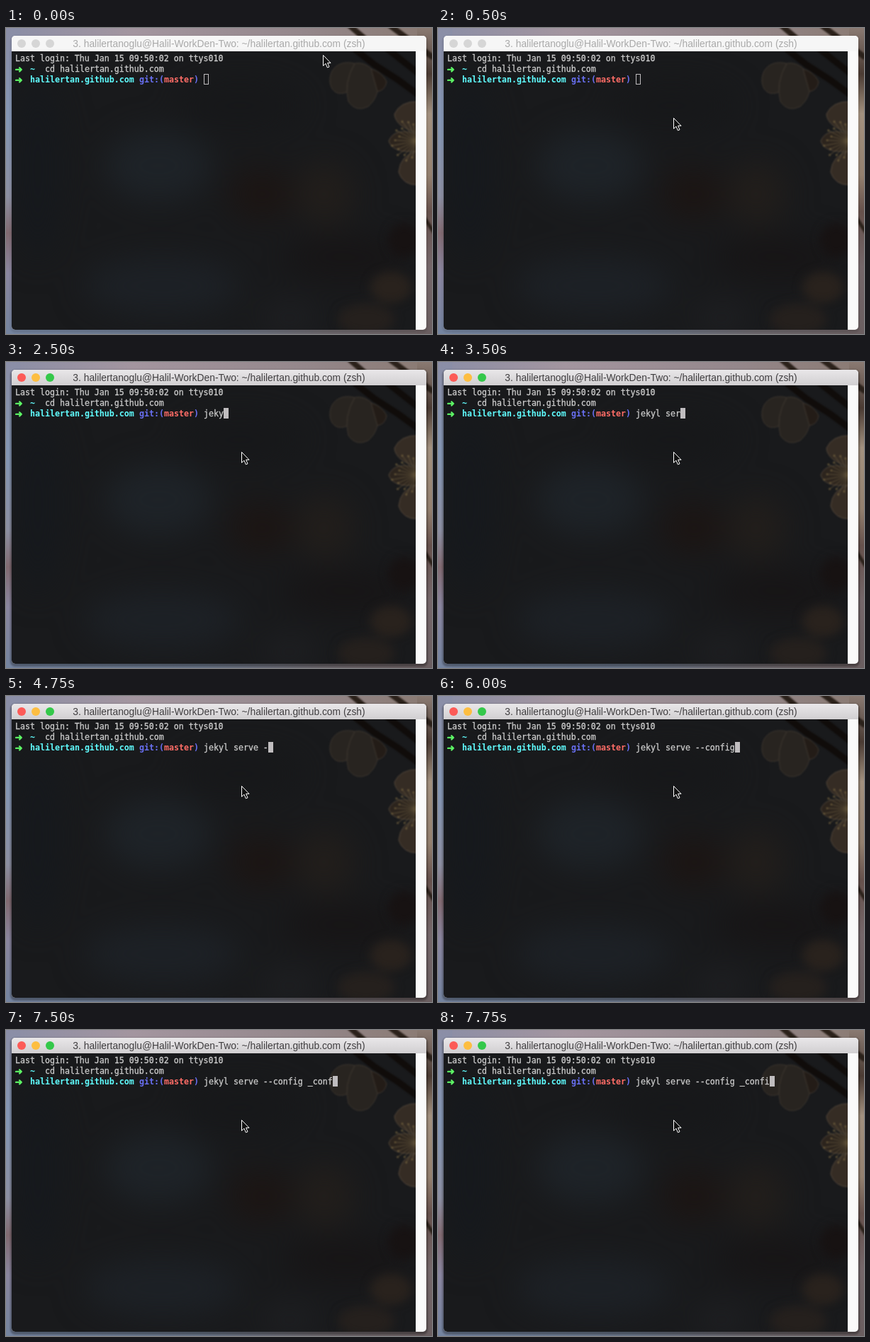
An HTML page for the animation above (8 s loop, 601 by 433 pixels).

```html
<!DOCTYPE html>
<html lang="en">
<head>
<meta charset="utf-8">
<title>Terminal</title>
<style>
html, body { margin: 0; width: 100%; height: 100%; overflow: hidden; }
svg { display: block; width: 601px; height: 433px; }
filter { color-interpolation-filters: sRGB; }
text { white-space: pre; }
.term { font: 11.627px "DejaVu Sans Mono", monospace; fill: #cbcbcb; stroke: #cbcbcb; stroke-width: .3px; }
.title { font: 13.84px "Liberation Sans", Arial, sans-serif; text-anchor: middle; }
.bold { font-weight: bold; stroke: none; }
.cyan { fill: #60fdff; }
.green { fill: #5ff967; stroke: #5ff967; stroke-width: .7px; font-family: "DejaVu Sans", sans-serif; font-size: 13px; }
.blue { fill: #6a71f6; }
.red { fill: #ff6d67; }
</style>
</head>
<body>
<svg viewBox="0 0 601 433">
  <defs>
    <filter id="soft" x="-100%" y="-100%" width="300%" height="300%"><feGaussianBlur stdDeviation="22"/></filter>
    <filter id="haze" x="-50%" y="-50%" width="200%" height="200%"><feGaussianBlur stdDeviation="7"/></filter>
    <filter id="edge" x="-10%" y="-10%" width="120%" height="120%"><feGaussianBlur stdDeviation="1"/></filter>
    <linearGradient id="top">
      <stop offset="0" stop-color="#8b8ea6"/><stop offset=".3" stop-color="#a3959f"/>
      <stop offset=".7" stop-color="#94878b"/><stop offset="1" stop-color="#8a7a72"/>
    </linearGradient>
    <linearGradient id="left" x2="0" y2="1">
      <stop offset="0" stop-color="#8b8ea6"/><stop offset=".3" stop-color="#8496b4"/>
      <stop offset=".55" stop-color="#8c8fa2"/><stop offset=".67" stop-color="#826b72"/>
      <stop offset=".8" stop-color="#8a86a0"/><stop offset="1" stop-color="#7484a0"/>
    </linearGradient>
    <linearGradient id="right" x2="0" y2="1">
      <stop offset="0" stop-color="#8a7a72"/><stop offset=".15" stop-color="#4b3b33"/>
      <stop offset=".28" stop-color="#a3917f"/><stop offset=".48" stop-color="#94806f"/>
      <stop offset=".6" stop-color="#66514c"/><stop offset=".78" stop-color="#75676a"/>
      <stop offset="1" stop-color="#6a5e60"/>
    </linearGradient>
    <linearGradient id="low">
      <stop offset="0" stop-color="#7484a0"/><stop offset=".45" stop-color="#6a768a"/>
      <stop offset=".75" stop-color="#6c676c"/><stop offset="1" stop-color="#6a5e60"/>
    </linearGradient>
    <linearGradient id="bar" x2="0" y2="1">
      <stop offset="0" stop-color="#e9e7e9"/><stop offset="1" stop-color="#d1cfd1"/>
    </linearGradient>
    <clipPath id="frame"><rect x="8" y="11" width="585" height="416" rx="5"/></clipPath>
    <clipPath id="pane"><rect x="8" y="33" width="570" height="394"/></clipPath>
  </defs>

  <!-- wallpaper -->
  <rect width="601" height="433" fill="url(#low)"/>
  <rect width="601" height="30" fill="url(#top)"/>
  <rect width="20" height="433" fill="url(#left)"/>
  <rect x="580" width="21" height="433" fill="url(#right)"/>
  <g fill="none" stroke="#2b211a" stroke-width="8" filter="url(#edge)">
    <path d="M484-4l28 24M541-4l62 46"/>
    <path d="M590 268l14 22" stroke-width="5"/>
  </g>
  <rect id="shadow" x="6" y="11" width="589" height="420" rx="7" filter="url(#edge)"/>

  <!-- window -->
  <g clip-path="url(#frame)">
    <rect x="8" y="11" width="585" height="416" fill="#fafafa"/>
    <rect id="titlebar" x="8" y="11" width="585" height="22"/>
    <g clip-path="url(#pane)">
      <rect x="8" y="33" width="570" height="394" fill="#191a1c"/>
      <g filter="url(#soft)">
        <ellipse cx="215" cy="195" rx="75" ry="50" fill="#1e2328"/>
        <ellipse cx="220" cy="365" rx="110" ry="40" fill="#1d2126"/>
        <ellipse cx="45" cy="200" rx="35" ry="130" fill="#16191d"/>
        <ellipse cx="330" cy="110" rx="90" ry="35" fill="#17181a"/>
        <ellipse cx="360" cy="235" rx="45" ry="35" fill="#1c1513"/>
        <ellipse cx="450" cy="235" rx="40" ry="45" fill="#221e1b"/>
        <ellipse cx="480" cy="325" rx="90" ry="30" fill="#171516"/>
        <ellipse cx="400" cy="410" rx="40" ry="20" fill="#1f2023"/>
      </g>
      <g filter="url(#haze)">
        <ellipse cx="543" cy="367" rx="29" ry="22" fill="#29221d"/>
        <ellipse cx="508" cy="412" rx="40" ry="22" fill="#25201d"/>
        <ellipse cx="562" cy="300" rx="22" ry="24" fill="#171212"/>
      </g>
      <g filter="url(#edge)">
        <path d="M492 30l28 22 34 22 30 22M536 28l48 38" fill="none" stroke="#100c0a" stroke-width="9"/>
        <g fill="#282420" stroke="#403931">
          <path d="M491 50C470 45 456 58 457 76C459 92 470 95 480 91Q497 72 491 50Z"/>
          <path d="M492 50Q476 78 483 104Q494 120 511 111C526 98 529 78 519 61Q506 47 492 50Z"/>
          <path d="M515 58Q530 62 537 76Q535 88 524 90Z" fill="#231c17"/>
          <g fill="#352c24" stroke="#564a3d">
            <path d="M580 104Q556 104 548 122Q550 140 580 148Z"/>
            <path d="M580 150Q548 140 540 160Q546 178 580 174Z" fill="#2c241d"/>
            <path d="M580 174Q556 180 554 204Q560 222 580 222Z"/>
          </g>
        </g>
        <g id="stamens" stroke="#61533a" fill="#7d6a42"></g>
      </g>
    </g>
    <g id="lights"></g>
  </g>
  <text id="title" class="title" x="300.5" y="27">3. halilertanoglu@Halil-WorkDen-Two: ~/halilertan.github.com (zsh)</text>

  <g class="term">
    <text x="13" y="47">Last login: Thu Jan 15 09:50:02 on ttys010</text>
    <text x="12.5" y="62.5" class="bold green">➜</text>
    <text x="34" y="62" class="bold cyan">~</text>
    <text x="55" y="62">cd halilertan.github.com</text>
    <text x="12.5" y="77.5" class="bold green">➜</text>
    <text x="34" y="77" class="bold cyan">halilertan.github.com</text>
    <text x="188" y="77" class="bold blue">git:(</text>
    <text x="223" y="77" class="bold red">master</text>
    <text x="265" y="77" class="bold blue">)</text>
    <text x="279" y="77" id="command"></text>
  </g>
  <rect id="caret" y="65.5" width="6" height="14" stroke="#c0bdbf"/>
  <path id="pointer" d="M.5.5V15.5L4 12.3L6.4 18L9 16.9L6.6 11.4H11Z" fill="#111" stroke="#fff"/>
</svg>
<script>
const $ = id => document.getElementById(id);
const LOOP = 8000, CELL = 7, PROMPT_X = 279;
const COMMAND = "jekyl serve --config _config";

// [time, characters typed]
const TYPING = [
  [0, 0], [1750, 1], [2000, 2], [2250, 3], [2500, 4], [2750, 5],
  [3000, 6], [3250, 8], [3500, 9], [3750, 11], [4000, 12],
  [4750, 13], [5000, 15], [5250, 16], [5500, 17], [5750, 18],
  [6000, 20], [6250, 21], [6750, 22], [7000, 23], [7250, 24], [7500, 26], [7750, 27]
];
// [time, x, y]
const POINTER = [[0, 447, 38], [250, 375, 94], [500, 332, 127]];
const LIGHTS = ["#fc5b57", "#fdbe41", "#34c84a"];

const at = (steps, t) => steps.findLast(step => step[0] <= t);

const set = (id, attrs) => {
  for (const name in attrs) $(id).setAttribute(name, attrs[name]);
};

$("lights").innerHTML = LIGHTS.map((_, i) => `<circle cx="${22 + 20 * i}" cy="22" r="6"/>`).join("");

// Filaments fan out to the left of the open flower's heart
let filaments = "";
for (let i = 0; i < 13; i++) {
  const angle = Math.PI * (0.58 + i * 0.072), r = 24 + (i * 7) % 12;
  const x = 579 + r * Math.cos(angle), y = 160 + r * Math.sin(angle);
  filaments += `<path d="M579 160L${x} ${y}"/><circle cx="${x}" cy="${y}" r="1.2" stroke="none"/>`;
}
$("stamens").innerHTML = filaments;

function draw(t) {
  const active = t >= 750;
  const typed = at(TYPING, t)[1];
  const [, x, y] = at(POINTER, t);

  set("titlebar", { fill: active ? "url(#bar)" : "#f6f6f6" });
  set("title", { fill: active ? "#403e40" : "#a9a9a9" });
  set("shadow", { opacity: active ? 0.3 : 0.1 });
  [...$("lights").children].forEach((light, i) => light.setAttribute("fill", active ? LIGHTS[i] : "#d6d6d6"));
  $("command").textContent = COMMAND.slice(0, typed);
  set("caret", { x: PROMPT_X + typed * CELL + 0.5, fill: active ? "#c0bdbf" : "none" });
  set("pointer", { transform: `translate(${x} ${y})` });
}

function tick() {
  draw(performance.now() % LOOP);
  requestAnimationFrame(tick);
}
tick();
</script>
</body>
</html>
```
